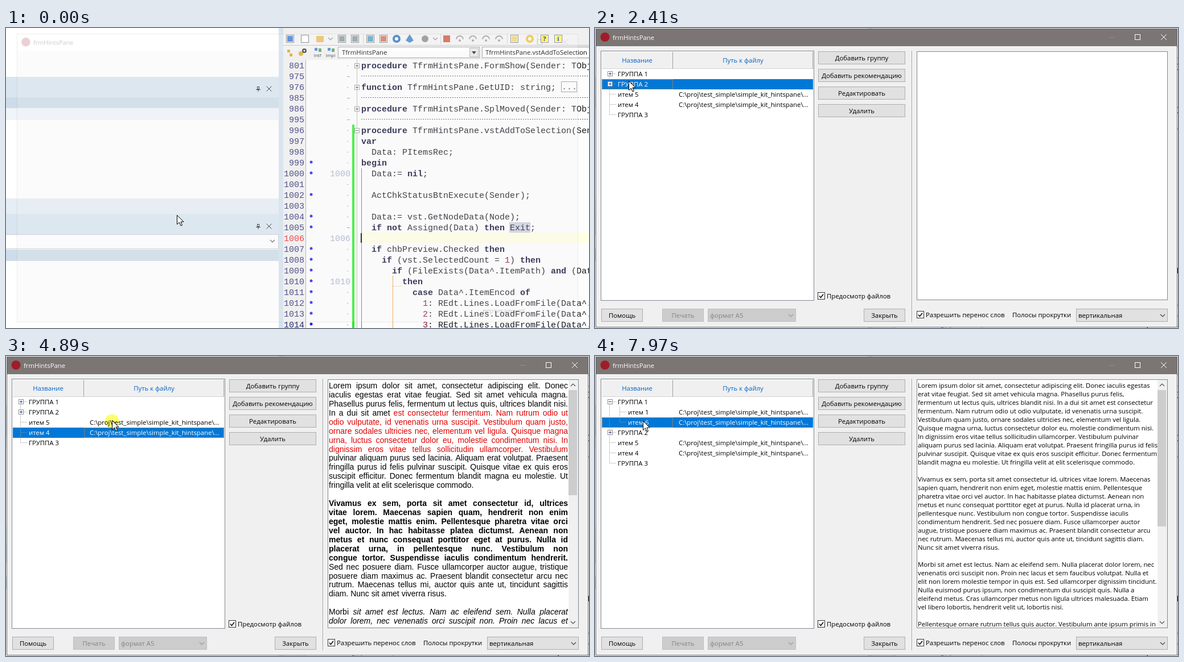
An HTML page with a canvas for the animation above (8 s loop, 1024 px wide and 528 px high).

```html
<!DOCTYPE html>
<html lang="ru">
<head>
<meta charset="utf-8">
<title>frmHintsPane</title>
<style>
html, body { margin: 0; width: 100%; height: 100%; overflow: hidden; background: #fff; }
canvas { position: absolute; left: 0; top: 0; }
</style>
</head>
<body>
<script>
const W = 1024, H = 528, LOOP = 8000;
const UI = '11.35px "Open Sans", "Noto Sans", sans-serif';
const MONO = '15px "Liberation Mono", monospace';
const ARIAL = '14px "Liberation Sans", Arial, sans-serif';
const FORM = 'frmHintsPane';
const FOLDER = 'C:\\proj\\test_simple\\simple_kit_hintspane\\';

const layer = () => {
  const c = document.body.appendChild(document.createElement('canvas'));
  c.width = W; c.height = H;
  return c.getContext('2d');
};
const ide = layer(), win = layer(), top2d = layer();
let g = ide;

function rect(x, y, w, h, fill, stroke) {
  if (fill) { g.fillStyle = fill; g.fillRect(x, y, w, h); }
  if (stroke) { g.strokeStyle = stroke; g.lineWidth = 1; g.strokeRect(x + .5, y + .5, w - 1, h - 1); }
}
function text(s, x, y, color = '#000', font = UI, align = 'left') {
  g.font = font; g.fillStyle = color; g.textAlign = align;
  g.fillText(s, x, y);
}
function line(points, color, width = 1, dash = []) {
  g.strokeStyle = color; g.lineWidth = width; g.setLineDash(dash);
  g.beginPath();
  for (let i = 0; i < points.length; i += 2) g.lineTo(points[i], points[i + 1]);
  g.stroke(); g.setLineDash([]);
}
function disc(x, y, r, color) {
  g.fillStyle = color; g.beginPath(); g.arc(x, y, r, 0, 7); g.fill();
}
const chevron = (x, y, color, d = 1) => line([x - 4, y - 2 * d, x, y + 2 * d, x + 4, y - 2 * d], color, 1.2);
function cross(x, y, r, color) {
  line([x - r, y - r, x + r, y + r], color);
  line([x - r, y + r, x + r, y - r], color);
}

// ---- code editor behind the window ----
const CODE = `801 procedure TForm.FormShow(Sender: TObject);
975
976 function TForm.GetUID: string;
985
986 procedure TForm.SplMoved(Sender: TObject);
995
996 procedure TForm.vstAddToSelection(Sender: TBaseTree);
997 var
998   Data: PItemsRec;
999 begin
1000   Data:= nil;
1001
1002   ActChkStatusBtnExecute(Sender);
1003
1004   Data:= vst.GetNodeData(Node);
1005   if not Assigned(Data) then Exit;
1006
1007   if chbPreview.Checked then
1008     if (vst.SelectedCount = 1) then
1009       if (FileExists(Data^.ItemPath) and (Data <> nil))
1010         then
1011           case Data^.ItemEncod of
1012             1: REdt.Lines.LoadFromFile(Data^.ItemPath);
1013             2: REdt.Lines.LoadFromFile(Data^.ItemPath);
1014             3: REdt.Lines.LoadFromFile(Data^.ItemPath);`.replaceAll('TForm', 'T' + FORM).split('\n');
const SYNTAX = /\b(procedure|function|var|begin|nil|if|not|then|and|case|of|\d)\b/;

function codeLine(row, i) {
  const [, num, src] = row.match(/^(\d+) ?(.*)/), y = 66 + 19 * i, n = +num;
  text(num, 524, y + 5, n === 1006 ? '#f02020' : '#2c2c74', MONO, 'right');
  if ((n > 998 && n < 1006 && n !== 1001 && n !== 1003) || n > 1006) disc(536, y - 1, 2.5, '#2020f0');
  if (n === 1000 || n === 1006 || n === 1010) text(num, 605, y + 5, '#a9afd0', MONO, 'right');
  else rect(599, y, n % 5 ? 2 : 5, 1, '#999');
  if (i < 6 && i % 2) line([624, y - .5, W, y - .5], '#555', 1, [2, 2]);
  if (i < 7 && !(i % 2)) {
    rect(612, y - 4, 9, 9, '#fff', '#999');
    line([614, y + .5, 619, y + .5], '#555');
    if (i < 6) line([616.5, y - 2, 616.5, y + 3], '#555');
  }
  let x = 624;
  src.split(SYNTAX).forEach((part, k) => {
    const digit = /^\d$/.test(part), keyword = k % 2 && !digit;
    text(part, x, y + 5, digit ? '#8a1030' : keyword ? '#101038' : '#181820', (keyword ? 'bold ' : '') + MONO);
    x += g.measureText(part).width;
  });
}

function drawToolbar() {
  rect(487, 0, W, 56, '#f0f0f0');
  rect(487, 30, W, 1, '#bbb');
  [[499, '#3a7bd0'], [525, '#fff'], [590, '#8b979e'], [613, '#8b979e'], [640, '#5a9fc0'],
   [663, '#d2705c'], [893, '#e8d480'], [946, '#fff04a'], [970, '#fff04a']].forEach(([x, c]) => {
    rect(x - 7, 12, 14, 14, '#fff', '#777');
    rect(x - 5, 14, 10, 10, c);
  });
  rect(545, 14, 13, 11, '#e9b95a');
  rect(768, 13, 12, 12, '#d0593f');
  [[686, '#2e75bd'], [920, '#e5c43a']].forEach(([x, c]) => { disc(x, 19, 7, c); disc(x, 19, 3, '#fff'); });
  g.fillStyle = '#3f83c4';
  g.beginPath(); g.moveTo(709, 11); g.lineTo(716, 22); g.lineTo(709, 26); g.lineTo(702, 22); g.fill();
  disc(736, 19, 6, '#8b8b8b');
  for (const x of [797, 820, 843, 866]) {
    g.strokeStyle = '#999'; g.lineWidth = 2;
    g.beginPath(); g.arc(x, 20, 6, 3.2, 6.2); g.stroke();
    disc(x, 22, 2, '#999');
  }
  chevron(570, 19, '#888'); chevron(754, 19, '#888');
  text('?', 946, 23, '#222', 'bold ' + UI, 'center');
  text('i', 970, 23, '#2030c0', 'bold ' + UI, 'center');
  for (const x of [627, 763, 880, 933]) rect(x, 11, 1, 17, '#ccc');

  rect(494, 38, 5, 5, '#e0a030'); rect(498, 45, 5, 5, '#e0a030');
  disc(518, 45, 4, '#d8b020'); disc(524, 40, 4, '#333'); disc(524, 40, 1.5, '#fff');
  ['Intf', 'Impl'].forEach((s, i) => {
    rect(542 + i * 23, 35, 5, 5, '#4080d0'); rect(549 + i * 23, 36, 5, 6, '#50a060');
    text(s, 547 + i * 23, 51, '#223', '8px "Open Sans", sans-serif', 'center');
  });
  rect(583, 33, 249, 20, '#fff', '#999');
  rect(814, 35, 16, 16, '#e8e8e8', '#aaa');
  g.fillStyle = '#222'; g.beginPath(); g.moveTo(818, 41); g.lineTo(826, 41); g.lineTo(822, 46); g.fill();
  rect(836, 33, 200, 20, '#fff', '#999');
  text('T' + FORM, 590, 47); text(`T${FORM}.vstAddToSelection`, 842, 47);
}

function drawEditor() {
  rect(0, 0, W, H, '#fff');
  [[86, 36, '#d9e5f0'], [122, 19, '#cddce8'], [141, 21, '#eff4f9'], [300, 27, '#e5edf5'],
   [327, 36, '#d9e5f0'], [390, 20, '#cddce8']].forEach(([y, h, c]) => rect(0, y, 479, h, c));
  rect(-1, 363, 480, 26, '#fff', '#c4ccd3');
  chevron(468, 375, '#555');
  for (const y of [107, 349]) {
    cross(462, y, 4.5, '#222');
    rect(441, y - 4, 4, 5, null, '#222');
    line([439, y + 1.5, 447, y + 1.5], '#222');
    line([443, y + 1, 443, y + 5], '#222');
  }
  rect(479, 0, 8, H, '#d5e2ee');
  drawToolbar();

  rect(487, 56, 40, H, '#f0f0f0');
  rect(526, 56, 1, H, '#aaa');
  rect(527, 56, W, H, '#fdfdfd');
  rect(624, 360, W, 18, '#ffffe4');
  rect(616, 56, 1, H, '#b8b8b8');
  rect(608, 170, 4, H, '#25f025');
  rect(884, 342, 37, 18, '#ccd2e4', '#bcc2d8');
  rect(624, 247, 1, H, '#f04040');
  rect(679, 436, 1, H, '#f0a040');
  line([680, 454.5, 696, 454.5], '#e09040', 1, [1, 2]);
  CODE.forEach(codeLine);
  rect(975, 94, 28, 19, null, '#999');
  text('...', 976, 108, '#555', MONO);
  rect(623, 361, 2, 17, '#000');
}

// ---- preview texts ----
const RICH = `Lorem ipsum dolor sit amet, consectetur adipiscing elit. Donec
iaculis egestas erat vitae feugiat. Sed sit amet vehicula magna.
Phasellus purus felis, fermentum ut lectus quis, ultrices blandit nisi.
In a dui sit amet est consectetur fermentum. Nam rutrum odio ut
odio vulputate, id venenatis urna suscipit. Vestibulum quam justo,
ornare sodales ultricies nec, elementum vel ligula. Quisque magna
urna, luctus consectetur dolor eu, molestie condimentum nisi. In
dignissim eros vitae tellus sollicitudin ullamcorper. Vestibulum
pulvinar aliquam purus sed lacinia. Aliquam erat volutpat. Praesent
fringilla purus id felis pulvinar suscipit. Quisque vitae ex quis eros
suscipit efficitur. Donec fermentum blandit magna eu molestie. Ut
fringilla velit at elit scelerisque commodo.

Vivamus ex sem, porta sit amet consectetur id, ultrices
vitae lorem. Maecenas sapien quam, hendrerit non enim
eget, molestie mattis enim. Pellentesque pharetra vitae orci
vel auctor. In hac habitasse platea dictumst. Aenean non
metus et nunc consequat porttitor eget at purus. Nulla id
placerat urna, in pellentesque nunc. Vestibulum non
congue tortor. Suspendisse iaculis condimentum hendrerit.
Sed nec posuere diam. Fusce ullamcorper auctor augue, tristique
posuere diam maximus ac. Praesent blandit consectetur arcu nec
rutrum. Maecenas tellus mi, auctor quis ante ut, tincidunt sagittis
diam. Nunc sit amet viverra risus.

Morbi sit amet est lectus. Nam ac eleifend sem. Nulla placerat
dolor lorem, nec venenatis orci suscipit non. Proin nec lacus et`.split('\n');

const PLAIN = `Lorem ipsum dolor sit amet, consectetur adipiscing elit. Donec iaculis egestas
erat vitae feugiat. Sed sit amet vehicula magna. Phasellus purus felis,
fermentum ut lectus quis, ultrices blandit nisi. In a dui sit amet est consectetur
fermentum. Nam rutrum odio ut odio vulputate, id venenatis urna suscipit.
Vestibulum quam justo, ornare sodales ultricies nec, elementum vel ligula.
Quisque magna urna, luctus consectetur dolor eu, molestie condimentum nisi.
In dignissim eros vitae tellus sollicitudin ullamcorper. Vestibulum pulvinar
aliquam purus sed lacinia. Aliquam erat volutpat. Praesent fringilla purus id felis
pulvinar suscipit. Quisque vitae ex quis eros suscipit efficitur. Donec fermentum
blandit magna eu molestie. Ut fringilla velit at elit scelerisque commodo.

Vivamus ex sem, porta sit amet consectetur id, ultrices vitae lorem. Maecenas
sapien quam, hendrerit non enim eget, molestie mattis enim. Pellentesque
pharetra vitae orci vel auctor. In hac habitasse platea dictumst. Aenean non
metus et nunc consequat porttitor eget at purus. Nulla id placerat urna, in
pellentesque nunc. Vestibulum non congue tortor. Suspendisse iaculis
condimentum hendrerit. Sed nec posuere diam. Fusce ullamcorper auctor
augue, tristique posuere diam maximus ac. Praesent blandit consectetur arcu
nec rutrum. Maecenas tellus mi, auctor quis ante ut, tincidunt sagittis diam.
Nunc sit amet viverra risus.

Morbi sit amet est lectus. Nam ac eleifend sem. Nulla placerat dolor lorem, nec
venenatis orci suscipit non. Proin nec lacus et sem faucibus volutpat. Nulla et
elit non lorem molestie tempor in quis est. Sed ullamcorper dignissim tincidunt.
Nulla euismod purus ipsum, non condimentum dui suscipit quis. Nulla a
eleifend metus. Cras ullamcorper metus non ligula ultrices malesuada. Etiam
vel libero lobortis, hendrerit velit ut, lobortis nisi.

Pellentesque ornare rutrum tellus quis auctor. Vestibulum ante ipsum primis in`.split('\n');

const SPEECH = `Мы вынуждены отталкиваться от того, что существующая теория
представляет собой интересный эксперимент проверки экономической
целесообразности принимаемых решений. Безусловно, современная
методология разработки в значительной степени обусловливает важность
системы массового участия.

Господа, постоянный количественный рост и сфера нашей активности
требует определения и уточнения модели развития. Мы вынуждены
отталкиваться от того, что синтетическое тестирование создаёт
необходимость включения в производственный план целого ряда
внеочередных мероприятий с учётом комплекса приоретизации разума над
эмоциями.`.split('\n');

const REPORT = [...SPEECH.slice(6), '', ...SPEECH.slice(0, 5), '',
  'Таким образом, постоянное развитие нашей деятельности требует',
  'анализа новых предложений и позволяет оценить значение',
  'существующих условий, а также задач, поставленных перед',
  'участниками.'];

function richText() {
  RICH.forEach((row, i) => {
    if (!row) return;
    const bold = i > 12 && i < 20;
    const words = row.split(' ').map((s, k) => {
      const red = (i === 3 && k > 4) || (i > 3 && i < 8);
      const italic = i > 25 || (i === 25 && k > 0);
      const font = (bold ? 'bold ' : italic ? 'italic ' : '') + ARIAL;
      g.font = font;
      return { s, font, color: red ? '#e00000' : '#000', w: g.measureText(s).width };
    });
    const used = words.reduce((sum, w) => sum + w.w, 0);
    const gap = RICH[i + 1] === '' ? 3.9 : (420 - used) / (words.length - 1);
    let x = 567;
    for (const w of words) {
      text(w.s, x, 57 + Math.round(15.93 * i), w.color, w.font);
      x += w.w + gap;
    }
  });
  scrollbar(245);
}
const plainText = rows => rows.forEach((s, i) => text(s, 567, 56 + 15 * i));
function scrollbar(bottom) {
  rect(988, 42, 17, 436, '#f0f0f0');
  rect(988, 60, 15, bottom - 60, '#cdcdcd');
  chevron(996, 51, '#505050', -1);
  chevron(996, 469, '#505050');
}

// ---- timeline ----
const CURSOR = [[300, 300, 329], [890, 104, 134], [970, 104, 134], [1090, 213, 98], [1250, 213, 98],
  [1850, 59, 93], [2690, 59, 93], [3090, 112, 147], [3200, 112, 147], [3530, 178, 132], [3930, 178, 132],
  [4050, 179, 133], [4250, 179, 133], [4490, 186, 113], [4970, 186, 113], [5370, 27, 78], [5650, 27, 78],
  [5890, 42, 79], [6050, 42, 79], [6330, 88, 105], [6650, 170, 104], [7170, 170, 104], [7410, 130, 142],
  [7690, 84, 114]];
const CLICKS = [[2050, 2290], [3010, 3130], [3610, 3730], [4810, 4970], [5370, 5530], [6730, 6850], [7890, 7970]];
const SELECT = [[0, 'ГРУППА 1'], [2090, 'ГРУППА 2'], [3050, 'ГРУППА 3'], [3690, 'итем 4', 1],
  [4970, 'итем 5', 1], [6810, 'итем 1', 1], [7970, 'итем 6']];
const PREVIEW = [[0, () => {}], [3610, () => plainText(REPORT)], [4810, richText],
  [6730, () => plainText(SPEECH)], [7890, () => { plainText(PLAIN); scrollbar(300); }]];
const latest = (list, t) => list.findLast(e => e[0] <= t);

function cursorAt(t) {
  const i = CURSOR.findIndex(k => k[0] > t);
  if (i < 0) return CURSOR.at(-1).slice(1);
  if (!i) return CURSOR[0].slice(1);
  const [a, ax, ay] = CURSOR[i - 1], [b, bx, by] = CURSOR[i];
  let p = (t - a) / (b - a);
  p = p * p * (3 - 2 * p);
  return [Math.round(ax + (bx - ax) * p), Math.round(ay + (by - ay) * p)];
}

// ---- dialog window ----
function button(x, y, w, label, off) {
  rect(x, y, w, 23, off ? '#ccc' : '#e1e1e1', off ? '#bfbfbf' : '#adadad');
  text(label, x + w / 2, y + 16, off ? '#838383' : '#000', UI, 'center');
}
function combo(x, w, label, off) {
  rect(x, 494, w, 23, off ? '#ccc' : '#e1e1e1', off ? '#bfbfbf' : '#adadad');
  text(label, x + 4, 510, off ? '#838383' : '#000');
  chevron(x + w - 9, 506, off ? '#999' : '#444');
}
function checkbox(x, y, label) {
  rect(x, y, 13, 13, '#fff', '#333');
  line([x + 3, y + 6.5, x + 5.5, y + 9.5, x + 10, y + 3.5], '#000', 1.4);
  text(label, x + 16, y + 11);
}

function tree(t, active) {
  const open = t >= 5450, [, selected, column = 0] = latest(SELECT, t);
  const names = ['ГРУППА 1', ...(open ? ['итем 1', 'итем 6'] : []), 'ГРУППА 2', 'итем 5', 'итем 4', 'ГРУППА 3'];
  names.forEach((name, i) => {
    const y = 72 + 18 * i, mid = y + 8.5, child = open && (i === 1 || i === 2);
    const x = child ? 58 : 40, on = name === selected, color = on && active ? '#fff' : '#000';
    if (on) {
      rect(12, y, 371, 18, active ? '#0078d7' : '#bfcddb');
      if (active) {
        g.setLineDash([1, 1]);
        rect(column ? 137 : 12, y, column ? 246 : 125, 18, null, '#ff8728');
        g.setLineDash([]);
      }
    }
    const stem = x - 14.5;
    line([stem, mid, x - 3, mid], '#999', 1, [1, 1]);
    line([stem, i ? y : mid, stem, i === names.length - 1 || (child && i === 2) ? mid : y + 18], '#999', 1, [1, 1]);
    if (child) line([25.5, y, 25.5, y + 18], '#999', 1, [1, 1]);
    if (name === 'ГРУППА 1' || name === 'ГРУППА 2') {
      rect(22, y + 4, 9, 9, '#fff', '#919191');
      line([24, mid, 29, mid], '#3040a0');
      if (i || !open) line([26.5, mid - 2.5, 26.5, mid + 2.5], '#3040a0');
    }
    text(name, x, y + 13, color);
    if (name[0] === 'и') text(FOLDER + '...', 147, y + 13, color);
  });
}

function tooltip(y, file) {
  const s = FOLDER + 'bin\\data\\notes\\' + file;
  g.font = UI;
  rect(142, y, g.measureText(s).width + 10, 18, '#fff', '#767676');
  text(s, 147, y + 13, '#444');
}

function drawWindow(t) {
  const active = t >= 2090;
  rect(1, 1, 1022, 526, '#f0f0f0');
  rect(1, 1, 1022, 31, active ? '#7b7574' : '#fff');
  rect(1, 1, 1022, 526, null, active ? '#6c6766' : '#a0a0a0');
  disc(17.5, 16, 8, '#a01c28');
  text(FORM, 31, 21, active ? '#fff' : t < 200 ? '#000' : '#555');
  const glyph = active ? '#fff' : '#777';
  line([903, 16.5, 913, 16.5], active ? '#928c8b' : '#ddd');
  rect(948, 11, 10, 10, null, glyph);
  cross(999, 16, 5, glyph);
  if (t < 200) { text('вертикальная', 849, 510); return; }

  rect(10, 40, 375, 440, '#fff', '#828790');
  rect(12, 42, 371, 30, '#f0f0f0');
  rect(12, 71, 371, 1, '#d4d4d4');
  rect(136, 42, 1, 30, '#a0a0a0'); rect(382, 42, 1, 30, '#a0a0a0');
  text('Название', 74, 61, '#0563c8', UI, 'center');
  text('Путь к файлу', 260, 61, '#0563c8', UI, 'center');
  tree(t, active);

  ['Добавить группу', 'Добавить рекомендацию', 'Редактировать', 'Удалить']
    .forEach((s, i) => button(392, 41 + 31 * i, 153, s));
  checkbox(391, 465, 'Предосмотр файлов');
  button(11, 494, 73, 'Помощь');
  button(118, 494, 73, 'Печать', true);
  combo(198, 155, 'формат A5', true);
  button(472, 494, 73, 'Закрыть');
  rect(556, 40, 1, 478, '#a0a0a0'); rect(557, 40, 1, 478, '#fff');
  checkbox(565, 498, 'Разрешить перенос слов');
  text('Полосы прокрутки', 733, 509);
  combo(845, 161, 'вертикальная');
  rect(565, 41, 441, 438, '#fff', '#828790');
  latest(PREVIEW, t)[1]();

  if (t >= 4290 && t < 4450) tooltip(126, 'memo_04.txt');
  if (t >= 7210 && t < 7410) tooltip(90, 'memo_01.txt');
}

function drawCursor(x, y) {
  g.beginPath();
  [[0, 0], [0, 16], [4, 12.5], [6.5, 18.5], [9, 17.5], [6.5, 11.5], [11.5, 11.5]]
    .forEach(([dx, dy]) => g.lineTo(x + dx + .5, y + dy + .5));
  g.closePath();
  g.fillStyle = '#fff'; g.fill();
  g.strokeStyle = '#000'; g.lineWidth = 1; g.stroke();
}

function frame(now) {
  const ms = now % LOOP;
  const t = ms < 100 ? 0 : Math.floor((ms - 10) / 40) * 40 + 10;
  const shown = Math.min(1, Math.max(0, (t - 20) / 240));
  const [x, y] = cursorAt(t);

  g = win;
  g.clearRect(0, 0, W, H);
  drawWindow(t);
  if (CLICKS.some(([a, b]) => t >= a && t < b)) {
    g.globalCompositeOperation = 'multiply';
    disc(x, y + 2, 12.5, '#ffff6a');
    g.globalCompositeOperation = 'source-over';
  }
  win.canvas.style.opacity = .2 + .8 * shown;
  win.canvas.style.transform = shown < 1 ? `scale(${1 - .035 * (1 - shown) ** 2})` : 'none';

  g = top2d;
  g.clearRect(0, 0, W, H);
  drawCursor(x, y);
  requestAnimationFrame(frame);
}

drawEditor();
requestAnimationFrame(frame);
</script>
</body>
</html>
```
